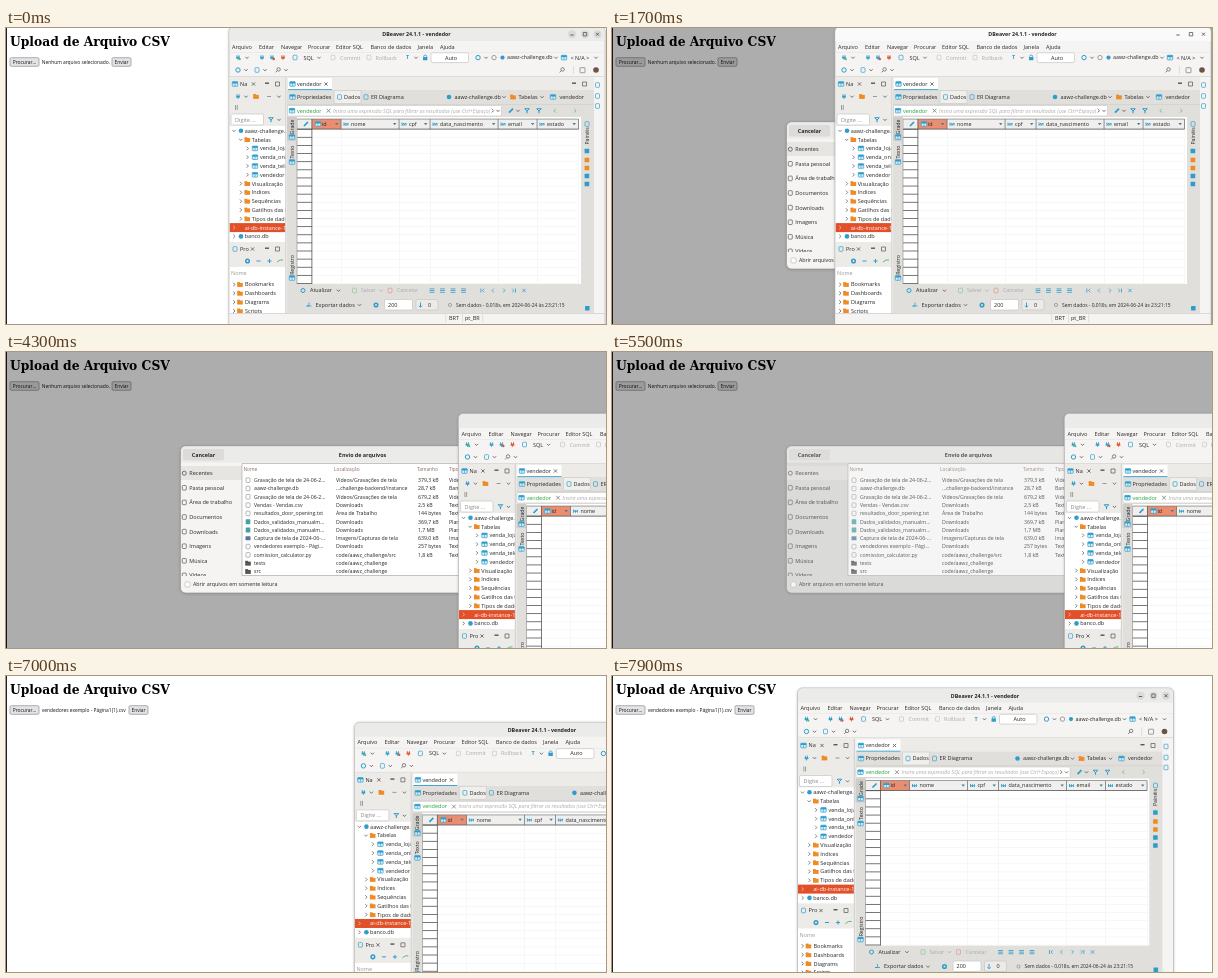
Write an HTML page with a canvas that moves like this. It is 600 by 296 pixels and loops after 8 s.

```html
<!DOCTYPE html>
<html lang="pt-BR">
<head>
<meta charset="utf-8">
<title>Upload de Arquivo CSV</title>
<style>
html, body { margin: 0; width: 100%; height: 100%; overflow: hidden; background: #fff; }
canvas { display: block; width: 600px; height: 296px; }
</style>
</head>
<body>
<canvas id="stage" width="600" height="296"></canvas>
<script>
const ctx = document.getElementById('stage').getContext('2d');
const LOOP = 8000;
const UI = '"Open Sans", "Noto Sans", sans-serif';
const INK = '#262626', GRAY = '#aaa', BLUE = '#2f9dcc', ORANGE = '#f08a24', RED = '#e2502a', GREEN = '#5cb870';
const LINE = '#cfcdca', LIGHT = '#f5f4f2', BAR = '#e0dfdb';

// Drawing helpers
function rect(x, y, w, h, fill) {
  ctx.fillStyle = fill;
  ctx.fillRect(x, y, w, h);
}
function panel(x, y, w, h, radius, fill, stroke) {
  ctx.beginPath();
  ctx.roundRect(x, y, w, h, radius);
  if (fill) { ctx.fillStyle = fill; ctx.fill(); }
  if (stroke) { ctx.strokeStyle = stroke; ctx.lineWidth = 0.7; ctx.stroke(); }
}
function text(str, x, y, { size = 5.5, color = INK, align = 'left', style = '', family = UI } = {}) {
  ctx.font = `${style} ${size}px ${family}`;
  ctx.fillStyle = color;
  ctx.textAlign = align;
  ctx.textBaseline = 'alphabetic';
  ctx.fillText(str, x, y + size * 0.35);
}
function upright(str, x, y) {
  ctx.save();
  ctx.translate(x, y);
  ctx.rotate(-Math.PI / 2);
  text(str, 0, 0, { size: 5.2, align: 'center' });
  ctx.restore();
}
function path(points, color = '#555', width = 0.8) {
  ctx.beginPath();
  points.forEach(([x, y], i) => i ? ctx.lineTo(x, y) : ctx.moveTo(x, y));
  ctx.strokeStyle = color;
  ctx.lineWidth = width;
  ctx.stroke();
}
function disc(x, y, r, color) {
  ctx.beginPath();
  ctx.arc(x, y, r, 0, 7);
  ctx.fillStyle = color;
  ctx.fill();
}
function ring(x, y, r, color, width = 1) {
  ctx.beginPath();
  ctx.arc(x, y, r, 0, 7);
  ctx.strokeStyle = color;
  ctx.lineWidth = width;
  ctx.stroke();
}
function clipped(x, y, w, h, draw) {
  ctx.save();
  ctx.beginPath();
  ctx.rect(x, y, w, h);
  ctx.clip();
  draw();
  ctx.restore();
}
function raised(x, y, w, h, radius) {
  ctx.save();
  ctx.shadowColor = 'rgba(0,0,0,.25)';
  ctx.shadowBlur = 3;
  ctx.shadowOffsetY = 0.5;
  panel(x, y, w, h, radius, LIGHT);
  ctx.restore();
}

// Small icons, centred on x, y
const down = (x, y, c) => path([[x - 1.6, y - 0.8], [x, y + 0.9], [x + 1.6, y - 0.8]], c);
const right = (x, y, c) => path([[x - 0.8, y - 1.8], [x + 1, y], [x - 0.8, y + 1.8]], c);
const left = (x, y, c) => path([[x + 0.8, y - 1.8], [x - 1, y], [x + 0.8, y + 1.8]], c);
const minus = (x, y, c = BLUE) => rect(x - 2, y - 0.5, 4, 1, c);
const plus = (x, y, c = BLUE) => { minus(x, y, c); rect(x - 0.5, y - 2, 1, 4, c); };
const gear = (x, y) => ring(x, y, 1.8, BLUE, 1.5);
const page = (x, y, c = BLUE) => panel(x - 2, y - 2.3, 4, 4.6, 0.8, null, c);
function cross(x, y, s = 1.6, c = '#555') {
  path([[x - s, y - s], [x + s, y + s]], c);
  path([[x + s, y - s], [x - s, y + s]], c);
}
function lens(x, y, c = '#666') {
  ring(x + 0.6, y - 0.6, 1.7, c, 0.8);
  path([[x - 0.6, y + 0.6], [x - 2.4, y + 2.4]], c);
}
function folder(x, y, c = ORANGE) {
  rect(x - 2.8, y - 2.4, 2.8, 1.5, c);
  rect(x - 2.8, y - 1.6, 5.6, 4, c);
}
function table(x, y) {
  panel(x - 2.7, y - 2.3, 5.4, 4.6, 0.5, '#d6edf7', BLUE);
  rect(x - 2.7, y - 2.3, 5.4, 1.8, BLUE);
  rect(x - 0.3, y - 1, 0.6, 3, BLUE);
}
function funnel(x, y) {
  path([[x - 2.3, y - 2], [x + 2.3, y - 2], [x, y + 0.4], [x - 2.3, y - 2]], BLUE, 1);
  path([[x, y], [x, y + 2.5]], BLUE, 1.1);
}
function plug(x, y, c) {
  path([[x - 1, y - 2.3], [x - 1, y]], c);
  path([[x + 1, y - 2.3], [x + 1, y]], c);
  rect(x - 1.8, y - 0.8, 3.6, 2, c);
  rect(x - 0.4, y + 1, 0.8, 1.5, c);
}
function pencil(x, y) {
  path([[x - 2, y + 2], [x + 2, y - 2]], BLUE, 1.7);
}
function paneButtons(x, y) {
  rect(x, y - 1.5, 4, 1.4, '#555');
  panel(x + 10.5, y - 2, 4, 4, 0, null, '#555');
}

// Web page
function button(label, x, w) {
  panel(x, 29.7, w, 8.6, 1.2, '#e3e3e6', '#8f8f98');
  text(label, x + w / 2, 34, { size: 4.9, color: '#111', align: 'center' });
}
function drawPage(chosen) {
  rect(0, 0, 600, 296, '#fff');
  rect(0, 0, 1, 296, '#222');
  text('Upload de Arquivo CSV', 4, 13.8,
    { size: 12.3, color: '#000', style: 'bold', family: '"DejaVu Serif", serif' });
  button('Procurar…', 4, 29);
  text(chosen ? 'vendedores exemplo - Página1(1).csv' : 'Nenhum arquivo selecionado.',
    35.7, 34, { size: 4.9, color: '#111' });
  button('Enviar', chosen ? 123 : 106, 19);
}

// File chooser
const PLACES = ['Recentes', 'Pasta pessoal', 'Área de trabalho', 'Documentos', 'Downloads', 'Imagens', 'Música', 'Vídeos'];
const FILES = [
  ['Gravação de tela de 24-06-2...', 'Vídeos/Gravações de tela', '379,3 kB', 'Vídeo'],
  ['aawz-challenge.db', '...challenge-backend/instance', '28,7 kB', 'Banco'],
  ['Gravação de tela de 24-06-2...', 'Vídeos/Gravações de tela', '679,2 kB', 'Vídeo'],
  ['Vendas - Vendas.csv', 'Downloads', '2,5 kB', 'Texto'],
  ['resultados_door_opening.txt', 'Área de Trabalho', '144 bytes', 'Texto'],
  ['Dados_validados_manualm...', 'Downloads', '369,7 kB', 'Planilha'],
  ['Dados_validados_manualm...', 'Downloads', '1,7 MB', 'Planilha'],
  ['Captura de tela de 2024-06-...', 'Imagens/Capturas de tela', '639,0 kB', 'Imagem'],
  ['vendedores exemplo - Pági...', 'Downloads', '257 bytes', 'Texto'],
  ['comission_calculator.py', 'code/aawz_challenge/src', '1,8 kB', 'Texto'],
  ['tests', 'code/aawz_challenge', '', ''],
  ['src', 'code/aawz_challenge', '', '']
];
function drawDialog() {
  raised(174.5, 94, 364, 147, 5);
  panel(174.5, 94, 364, 147, 5, null, '#999');
  panel(175, 94.4, 363, 16.2, [5, 5, 0, 0], '#ebebea');
  panel(177, 97, 41, 11.5, 2, '#dcdbda');
  text('Cancelar', 197.5, 102.7, { size: 5.4, style: 'bold', align: 'center' });
  text('Envio de arquivos', 356.5, 102.7, { size: 5.4, style: 'bold', align: 'center' });
  clipped(175, 111, 61, 113, () => {
    rect(175, 114, 61, 14, '#e6e5e2');
    PLACES.forEach((name, i) => {
      const y = 121.2 + i * 14.6;
      i ? page(178.3, y, '#555') : ring(178.3, y, 2, '#555', 0.8);
      text(name, 183.3, y);
    });
  });
  panel(236, 111.5, 301, 112, 0, '#fff', '#b3aaa4');
  ['Nome', 'Localização', 'Tamanho', 'Tipo'].forEach((name, i) =>
    text(name, [237.5, 328, 411, 443][i], 117.6, { size: 4.8, color: '#8a6a5c' }));
  FILES.forEach((row, i) => {
    const y = 128.2 + i * 8.3;
    if (i > 9) folder(242, y, '#555');
    else if (i === 5 || i === 6) panel(239.7, y - 2.5, 4.6, 5, 0.6, '#4a9fa3');
    else if (i === 7) panel(239.5, y - 2, 5, 4, 0.4, '#56789b');
    else page(242, y, '#999');
    row.forEach((cell, j) => text(cell, [248, 330, 412, 443][j], y, { size: 5.2 }));
  });
  panel(179, 230, 5, 5, 1, '#fff', '#bbb');
  text('Abrir arquivos em somente leitura', 187, 232.6, { size: 5.3 });
}

// Database client, laid out at its starting place
function drawChrome(focused) {
  raised(223, -1.5, 376, 299, [5, 5, 0, 0]);
  panel(223, -1.5, 376, 299, [5, 5, 0, 0], null, '#b5b5b5');
  panel(223.4, -1.1, 375.2, 14, [5, 5, 0, 0], focused ? '#ebebea' : '#fafafa');
  text('DBeaver 24.1.1 - vendedor', 410.5, 6.2, { size: 5.3, style: 'bold', align: 'center' });
  if (focused) [566, 579, 591.5].forEach(x => disc(x, 6.2, 4, '#dadad9'));
  rect(564.3, 6.6, 3.4, 0.8, '#444');
  panel(577.3, 4.5, 3.4, 3.4, 0, null, '#444');
  cross(591.5, 6.2, 1.5, '#444');
  const menu = { Arquivo: 226, Editar: 253, Navegar: 275, Procurar: 302, 'Editor SQL': 330, 'Banco de dados': 364.5, Janela: 411.5, Ajuda: 434 };
  for (const name in menu) text(name, menu[name], 18.7);
  rect(223.5, 24, 375, 0.5, '#e2e0de');

  plug(232, 29.5, BLUE);
  disc(233.8, 31.2, 1.1, GREEN);
  plug(256, 29.5, BLUE);
  plug(266, 29.5, BLUE);
  disc(267.8, 31, 1.2, RED);
  plug(277, 29.5, RED);
  page(289, 29.5);
  text('SQL', 297.5, 29.6);
  page(327, 29.5, '#c4c4c4');
  text('Commit', 334, 29.6, { color: GRAY });
  page(363, 29.5, '#c4c4c4');
  text('Rollback', 369.5, 29.6, { color: GRAY });
  text('T', 400, 29.5, { color: BLUE, style: 'bold' });
  panel(417, 29, 4.4, 3.2, 0.5, BLUE);
  ring(419.2, 28.5, 1.5, BLUE, 0.8);
  panel(425, 24.8, 37.5, 9.8, 1.5, '#fff', '#c8c6c4');
  text('Auto', 445, 29.7, { align: 'center' });
  ring(472, 29.6, 2.2, BLUE);
  ring(488, 29.6, 2.2, '#888', 0.8);
  disc(496.5, 29.6, 2.1, BLUE);
  text('aawz-challenge.db', 501, 29.6, { size: 5.3 });
  table(558, 29.6);
  text('< N/A >', 564.5, 29.6);
  [241, 313, 410, 480, 550, 590].forEach(x => down(x, 29.6));
  ring(232, 42, 2.2, BLUE);
  page(251, 42);
  lens(272, 42);
  [240, 259, 280].forEach(x => down(x, 42));
  lens(556, 42);
  rect(567, 38, 0.6, 8, LINE);
  panel(574, 39.7, 5, 5, 0.5, null, '#777');
  disc(590, 42, 2.8, '#705344');
  rect(223.5, 48, 375, 0.6, LINE);
}

const TREE = [
  ['aawz-challenge.db', 0, 'db'], ['Tabelas', 1, 'folder'],
  ['venda_loja', 2, 'table'], ['venda_online', 2, 'table'], ['venda_televendas', 2, 'table'], ['vendedor', 2, 'table'],
  ['Visualização', 1, 'folder'], ['Indices', 1, 'folder'], ['Sequências', 1, 'folder'],
  ['Gatilhos das tabelas', 1, 'folder'], ['Tipos de dados', 1, 'folder'],
  ['ai-db-instance-1', 0, ''], ['banco.db', 0, 'db']
];
function drawNavigator() {
  clipped(223.5, 49, 56, 247, () => {
    rect(223.5, 49, 56, 49, '#ecebe8');
    table(229, 56);
    text('Na', 234, 56);
    cross(247.5, 56);
    paneButtons(259, 56);
    plug(232, 68.5, BLUE);
    down(240, 68.5);
    folder(250, 68.5);
    minus(263, 68.5, '#999');
    down(273, 68.5);
    rect(229, 77, 0.8, 5, '#888');
    rect(230.8, 77, 0.8, 5, '#888');
    panel(225, 86, 32.5, 11, 1.5, '#fff', '#c8c6c4');
    text('Digite ...', 229, 91.7, { color: '#888' });
    funnel(265, 91.7);
    down(273, 91.7);
    rect(223.5, 98, 56, 116, '#fff');
    TREE.forEach(([name, depth, kind], i) => {
      const y = 102.8 + i * 8.8, x = 228 + depth * 6.7, picked = i === 11;
      if (picked) rect(223.5, y - 4.5, 56, 9, RED);
      (i < 2 ? down : right)(x, y, picked ? '#f9c0ad' : '#666');
      if (kind === 'folder') folder(241.3, y);
      if (kind === 'table') table(249, y);
      if (kind === 'db') disc(235, y, 2.3, BLUE);
      text(name, [238.7, 245.8, 254][depth], y, { color: picked ? '#fff' : INK });
    });
    rect(223.5, 214, 56, 26, '#ecebe8');
    page(229, 221);
    text('Pro', 234, 221);
    cross(246.5, 221);
    paneButtons(259, 221);
    gear(241.5, 233);
    minus(252.5, 233);
    plus(263.5, 233);
    path([[271, 234], [274, 232], [277, 232]], GREEN, 1);
    rect(223.5, 239, 56, 57, '#fff');
    text('Nome', 225, 245.5, { color: '#999' });
    ['Bookmarks', 'Dashboards', 'Diagrams', 'Scripts'].forEach((name, i) => {
      const y = 256.5 + i * 8.8;
      right(228, y);
      folder(234, y);
      text(name, 239, y);
    });
    rect(223.5, 285, 56, 11, LIGHT);
  });
  rect(279.3, 49, 1, 237, LINE);
}

const COLUMNS = [['id', 306, 29], ['nome', 335, 58], ['cpf', 393, 31], ['data_nascimento', 424, 68], ['email', 492, 39], ['estado', 531, 41.5]];
function drawGrid() {
  rect(291, 89, 284, 167, '#fff');
  rect(291, 91, 282, 10, '#f0efee');
  pencil(300, 96);
  for (let y = 101; y < 256; y += 8.12) {
    rect(306, y, 266.5, 0.5, '#efefef');
    rect(291, y - 0.2, 15, 0.8, '#555');
  }
  COLUMNS.forEach(([name, x, w], i) => {
    if (!i) rect(x, 91, w, 10, '#eb8d70');
    text(name, x + 10, 96, { size: 5.4 });
    if (i) {
      path([[x + 3, 94.5], [x + 3, 97.5], [x + 5, 95], [x + 5, 97.5], [x + 7, 95], [x + 7, 97.5]], BLUE, 0.9);
    } else table(x + 6, 96);
    ctx.beginPath();
    ctx.moveTo(x + w - 6, 95);
    ctx.lineTo(x + w - 2.6, 95);
    ctx.lineTo(x + w - 4.3, 97.2);
    ctx.fillStyle = '#3f7f9a';
    ctx.fill();
    rect(x + w, 101, 0.5, 155, '#efefef');
    rect(x + w - 0.3, 91, 0.7, 10, '#666');
  });
  rect(291, 90.7, 281.5, 0.7, '#777');
  rect(291, 100.7, 281.5, 0.8, '#555');
  rect(305.5, 91, 0.8, 165, '#555');
  rect(290.7, 91, 0.6, 165, '#888');
}

function drawEditor() {
  rect(281, 49, 307, 13, '#ecebe8');
  rect(281, 62, 307, 223, BAR);
  rect(282, 50, 44, 12, '#fff');
  rect(282, 61.2, 44, 0.9, BLUE);
  table(286.5, 56);
  text('vendedor', 291, 56);
  cross(320, 56);
  paneButtons(566, 56);
  rect(328, 62.5, 27, 13, '#f0efec');
  panel(328, 62.5, 27, 13, 0, null, LINE);
  table(286.5, 69);
  text('Propriedades', 291, 69);
  page(333.5, 69);
  text('Dados', 338, 69);
  page(360, 69);
  text('ER Diagrama', 365, 69);
  disc(443, 69, 2.3, BLUE);
  text('aawz-challenge.db', 448.5, 69, { size: 5.4 });
  down(498, 69);
  folder(507, 69);
  text('Tabelas', 512.5, 69);
  down(536, 69);
  table(547, 69);
  text('vendedor', 553.5, 69);
  rect(281, 76, 307, 0.6, LINE);

  panel(281.5, 77.5, 214, 10.5, 1, '#fff', LINE);
  table(286, 82.7);
  text('vendedor', 291, 82.7, { color: '#23a03c' });
  cross(322.5, 82.7, 1.9, '#777');
  clipped(326, 77, 159, 12, () =>
    text('Insira uma expressão SQL para filtrar os resultados (use Ctrl+Espaço)', 327, 82.7,
      { color: GRAY, style: 'italic', size: 5.2 }));
  right(486.5, 82.7);
  down(492, 82.7);
  pencil(505, 82.7);
  down(512, 82.7);
  funnel(521, 82.7);
  funnel(533, 82.7);
  left(549, 82.7, GREEN);
  right(569, 82.7, GREEN);

  drawGrid();
  rect(281, 89, 9.7, 24, '#cfcdc9');
  upright('Grade', 286.2, 99);
  upright('Texto', 286.2, 124);
  upright('Registro', 286.2, 237);
  [109, 134, 250].forEach(y => table(286, y));
  rect(575, 89, 12, 167, BAR);
  page(581, 96);
  upright('Painéis', 581, 108);
  [123, 132, 140, 148, 156].forEach((y, i) => panel(578.6, y - 2.3, 4.6, 4.6, 0.6, i === 1 || i === 2 ? ORANGE : BLUE));
  [57, 68, 78].forEach(y => page(591.5, y));

  ring(297, 262.5, 2, BLUE);
  text('Atualizar', 304, 262.5, { size: 5.4 });
  down(332.5, 262.5);
  page(348.5, 262.5, '#8cc795');
  text('Salvar', 355, 262.5, { color: GRAY, size: 5.2 });
  down(375, 262.5, GRAY);
  page(384, 262.5, '#e0958b');
  text('Cancelar', 391, 262.5, { color: GRAY, size: 5.2 });
  [426, 436.5, 447, 457.5].forEach(x => {
    [-1.7, 0, 1.7].forEach(d => rect(x - 2.4, 262.2 + d, 4.8, 0.8, BLUE));
  });
  rect(474.5, 260.5, 0.8, 4, BLUE);
  left(477.5, 262.5, BLUE);
  left(487, 262.5, BLUE);
  right(498, 262.5, BLUE);
  right(507, 262.5, BLUE);
  rect(509, 260.5, 0.8, 4, BLUE);
  cross(518, 262.5, 1.7, BLUE);

  path([[303, 274.5], [303, 278], [300.5, 278], [305.5, 278]], BLUE);
  text('Exportar dados', 309.5, 277);
  down(353.5, 277);
  gear(370, 277);
  panel(378.5, 271.5, 28, 10.5, 1.5, '#fff', '#c8c6c4');
  text('200', 382, 277);
  panel(410, 271.5, 22, 10.5, 1.5, '#ecebe8', '#c8c6c4');
  path([[414.5, 274.5], [414.5, 279]], BLUE, 1);
  down(414.5, 278.5, BLUE);
  text('0', 422, 277);
  ring(444, 277, 1.6, '#888', 0.7);
  text('Sem dados - 0,018s, em 2024-06-24 às 23:21:15', 450, 277, { size: 4.95 });
  panel(579, 278, 4.6, 4.6, 0.6, BLUE);
  rect(223.5, 285, 375, 0.7, LINE);
  rect(439.5, 286.5, 0.6, 8, LINE);
  text('BRT', 443, 290.5);
  rect(456, 286.5, 0.6, 8, LINE);
  text('pt_BR', 459, 290.5);
  rect(476.5, 286.5, 0.6, 8, LINE);
}

// Timing
const progress = (t, from, to) => Math.min(1, Math.max(0, (t - from) / (to - from)));
const smooth = p => p * p * (3 - 2 * p);
const mix = (a, b, p) => a + (b - a) * p;

function windowOffset(t) {
  const away = [229.5, 63], turn = [126, 48], end = [-37.5, 13.5];
  let from = [0, 0], to = away, p = smooth(progress(t, 1900, 3207));
  if (t >= 7000) {
    [from, to, p] = [turn, end, 1 - (1 - progress(t, 7000, 7550)) ** 2];
  } else if (t >= 6600) {
    [from, to, p] = [away, turn, progress(t, 6600, 7000) ** 2];
  }
  return [mix(from[0], to[0], p), mix(from[1], to[1], p)];
}

function render(t) {
  drawPage(t >= 5950);
  const shade = 0.32 * smooth(progress(t, 700, 1200)) * (1 - progress(t, 5500, 5970));
  if (shade > 0) rect(0, 0, 600, 296, `rgba(0,0,0,${shade})`);

  const shown = progress(t, 950, 1200) * (1 - progress(t, 5450, 5650));
  if (shown > 0) {
    ctx.save();
    ctx.globalAlpha = shown;
    drawDialog();
    ctx.restore();
  }

  ctx.save();
  ctx.translate(...windowOffset(t));
  drawChrome(t < 950 || t >= 1900);
  drawNavigator();
  drawEditor();
  ctx.restore();
}

const start = performance.now();
function tick() {
  render((performance.now() - start) % LOOP);
  requestAnimationFrame(tick);
}
tick();
</script>
</body>
</html>
```
